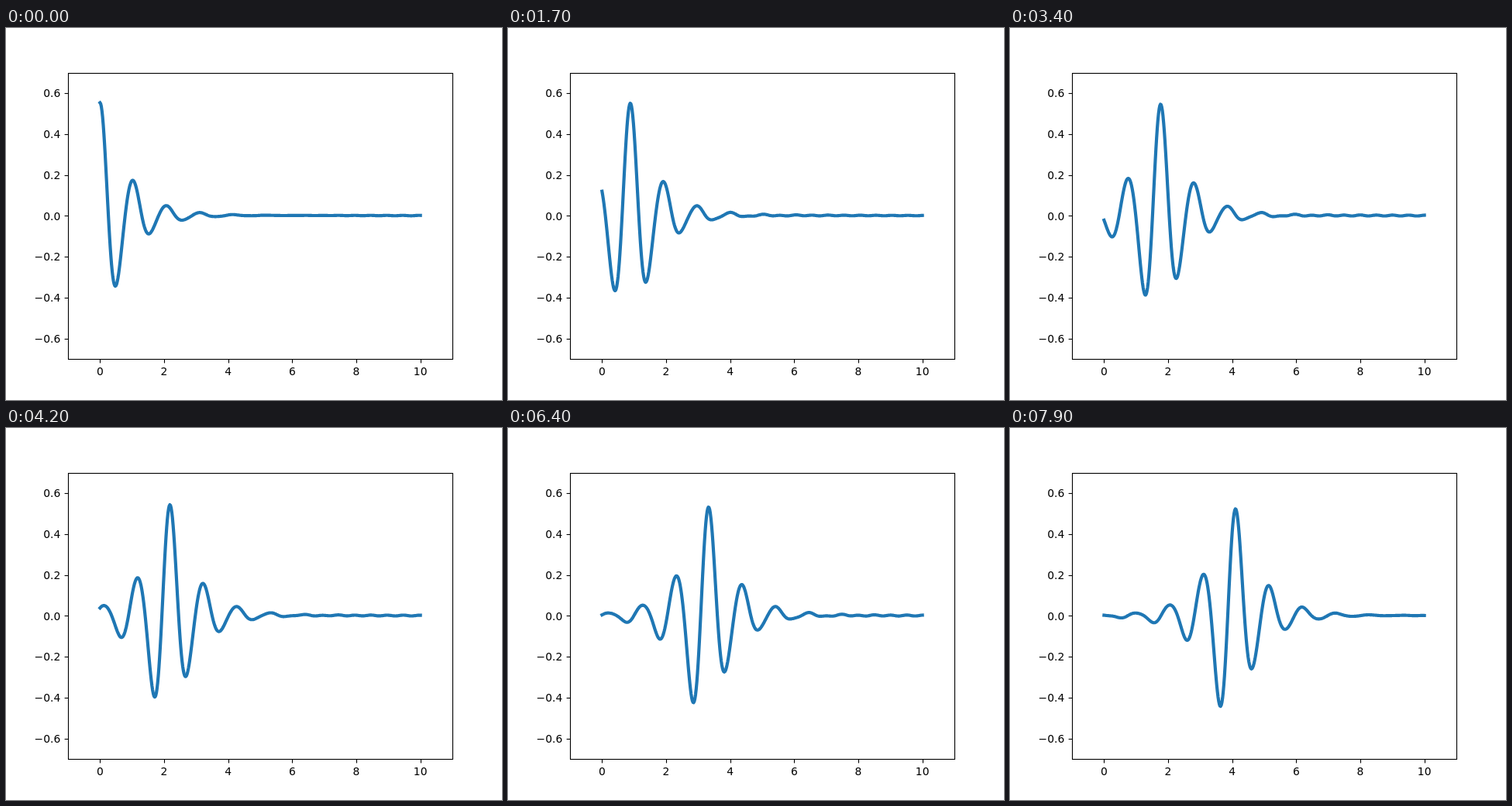
Write an HTML page that moves like this. It is 640 px wide and 480 px high and loops after 8000 ms.

```html
<!DOCTYPE html>
<html lang="en">
<head>
<meta charset="utf-8">
<title>Wave packet</title>
<style>
  html, body { margin: 0; width: 100%; height: 100%; overflow: hidden; background: #fff; }
  svg { display: block; width: 640px; height: 480px; }
  text { font: 13.889px "DejaVu Sans", sans-serif; fill: #000; }
  .axis { fill: none; stroke: #000; stroke-width: 1.11; stroke-linecap: square; }
  .tick { stroke: #000; stroke-width: 1.11; }
  #wave { fill: none; stroke: #1f77b4; stroke-width: 4.167; stroke-linecap: square; stroke-linejoin: round; }
</style>
</head>
<body>
<svg viewBox="0 0 640 480">
  <g id="ticks"></g>
  <path id="wave"/>
  <rect class="axis" x="80.5" y="58.5" width="496" height="369"/>
</svg>
<script>
const NS = "http://www.w3.org/2000/svg";
const FRAMES = 80, STEP_MS = 100, DT = 0.05;
const ticks = document.getElementById("ticks");
const wave = document.getElementById("wave");

const px = x => 80 + (x + 1) * 496 / 12;
const py = y => 242.4 - y * 264;
const snap = v => Math.floor(v + 0.5) + 0.5;

function add(tag, attrs, label = "") {
  const el = document.createElementNS(NS, tag);
  for (const name in attrs) el.setAttribute(name, attrs[name]);
  el.textContent = label;
  ticks.appendChild(el);
}

for (let x = 0; x <= 10; x += 2) {
  const at = snap(px(x));
  add("line", { class: "tick", x1: at, x2: at, y1: 427.5, y2: 432.4 });
  add("text", { x: px(x), y: 448, "text-anchor": "middle" }, x);
}
for (let i = -3; i <= 3; i++) {
  const y = i * 0.2, at = snap(py(y));
  add("line", { class: "tick", x1: 75.6, x2: 80.5, y1: at, y2: at });
  add("text", { x: 70.3, y: Math.round(py(y) + 5.2), "text-anchor": "end" },
    y.toFixed(1).replace("-", "\u2212"));
}

// Envelope: band-limited Lorentzian spectrum, normalised to 1 at s = 0
const BAND = 2 * Math.PI, WIDTH = 0.4 * Math.PI, MODES = 60;
const modes = Array.from({ length: MODES }, (_, i) => {
  const q = (i + 0.5) * BAND / MODES;
  return { q, weight: 1 / (q * q + WIDTH * WIDTH) };
});
const total = modes.reduce((sum, m) => sum + m.weight, 0);
const envelope = s => modes.reduce((sum, m) => sum + m.weight * Math.cos(m.q * s), 0) / total;

// Faint standing ripple ahead of the packet
const ripple = (x, s) =>
  (0.001 + 0.0012 * Math.cos(4 * Math.PI * x)) / (1 + Math.exp(-4 * s));

const K0 = 6.02, W0 = 2 * Math.PI, POINTS = 500;

function height(x, t) {
  const s = x - t;
  return 0.5515 * envelope(s) * Math.cos(K0 * x - W0 * t) + ripple(x, s);
}

function draw(t) {
  const points = [];
  for (let i = 0; i <= POINTS; i++) {
    const x = 10 * i / POINTS;
    points.push(px(x).toFixed(2) + "," + py(height(x, t)).toFixed(2));
  }
  wave.setAttribute("d", "M" + points.join("L"));
}

const start = performance.now();
let shown = -1;

function tick() {
  const frame = Math.floor((performance.now() - start) / STEP_MS) % FRAMES;
  if (frame !== shown) {
    shown = frame;
    draw(frame * DT);
  }
  requestAnimationFrame(tick);
}
tick();
</script>
</body>
</html>
```
